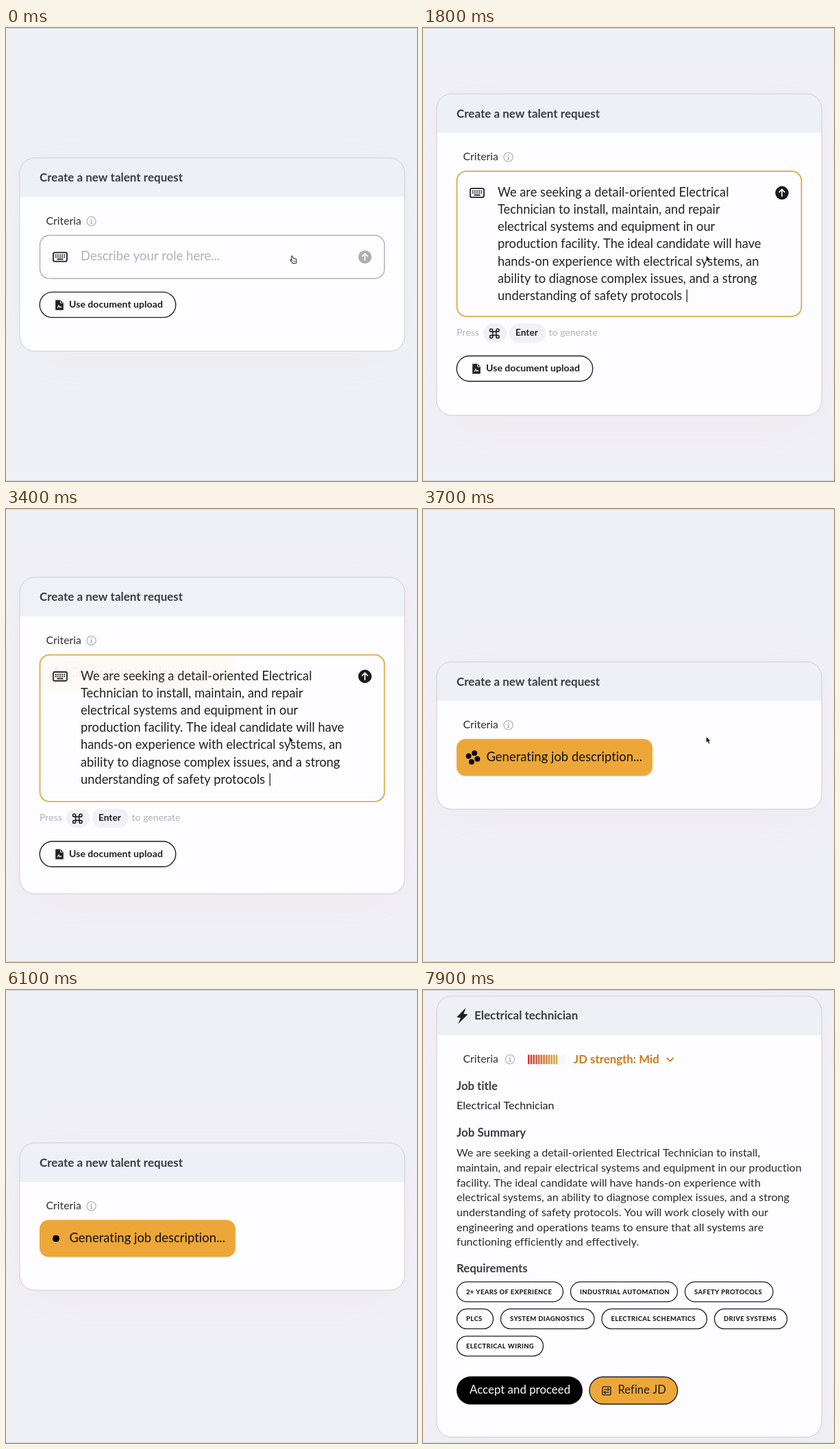
An HTML page with a canvas that plays this animation: 600x661 px, repeating every 8 s.

```html
<!DOCTYPE html>
<html lang="en">
<head>
<meta charset="utf-8">
<title>Talent request</title>
<style>
  html, body { margin: 0; width: 100%; height: 100%; overflow: hidden; background: #eef1f6; }
  canvas { display: block; }
</style>
</head>
<body>
<canvas id="stage" width="600" height="661"></canvas>
<script>
const ctx = document.getElementById('stage').getContext('2d');
const LOOP = 8000;
const CENTER_Y = 330.6;
const INK = '#1f1f23', HEAD = '#3b3c42', GREY = '#b2b2b5', AMBER = '#eda738', RUST = '#cc7a1c';
const PAPER = '#fdfcfe', COOL = '#edf1f6', WARM = '#eff0f6';

const ROLE_LINES = [
  'We are seeking a detail-oriented Electrical',
  'Technician to install, maintain, and repair',
  'electrical systems and equipment in our',
  'production facility. The ideal candidate will have',
  'hands-on experience with electrical systems, an',
  'ability to diagnose complex issues, and a strong',
  'understanding of safety protocols |'
];
const SUMMARY_LINES = [
  'We are seeking a detail-oriented Electrical Technician to install,',
  'maintain, and repair electrical systems and equipment in our production',
  'facility. The ideal candidate will have hands-on experience with',
  'electrical systems, an ability to diagnose complex issues, and a strong',
  'understanding of safety protocols. You will work closely with our',
  'engineering and operations teams to ensure that all systems are',
  'functioning efficiently and effectively.'
];
// Rows of [label, left, right]
const TAG_ROWS = [
  [['2+ YEARS OF EXPERIENCE', 49, 205], ['INDUSTRIAL AUTOMATION', 215, 372], ['SAFETY PROTOCOLS', 382, 511.5]],
  [['PLCS', 49, 103], ['SYSTEM DIAGNOSTICS', 113, 250.5], ['ELECTRICAL SCHEMATICS', 260.5, 415], ['DRIVE SYSTEMS', 425, 532]],
  [['ELECTRICAL WIRING', 49, 176]]
];

function ease(t, start, duration) {
  const p = Math.min(1, Math.max(0, (t - start) / duration));
  return p < 0.5 ? 16 * p ** 5 : 1 - 16 * (1 - p) ** 5;
}

// Outgoing content lingers a little longer than the motion.
const fadeOut = e => 1 - e ** 1.6;

// A minimal spacing also switches ligatures off.
function text(str, x, y, size, color = INK, weight = 400, spacing = 0.01) {
  ctx.font = `${weight} ${size}px Lato, sans-serif`;
  ctx.letterSpacing = `${spacing}px`;
  ctx.fillStyle = color;
  ctx.fillText(str, x, y);
}

function box(x, y, w, h, r, fill, stroke, line = 1.3) {
  ctx.beginPath();
  ctx.roundRect(x, y, w, h, r);
  paint(fill, stroke, line);
}

function disc(x, y, r, fill, stroke, line) {
  ctx.beginPath();
  ctx.arc(x, y, r, 0, 7);
  paint(fill, stroke, line);
}

function poly(points, fill, stroke, line, close = true) {
  ctx.beginPath();
  points.forEach(([x, y]) => ctx.lineTo(x, y));
  if (close) ctx.closePath();
  paint(fill, stroke, line);
}

function paint(fill, stroke, line) {
  if (fill) { ctx.fillStyle = fill; ctx.fill(); }
  if (stroke) { ctx.strokeStyle = stroke; ctx.lineWidth = line; ctx.stroke(); }
}

function layer(alpha, draw) {
  if (alpha < 0.004) return;
  ctx.save();
  ctx.globalAlpha *= alpha;
  draw();
  ctx.restore();
}

function at(x, y, draw) {
  ctx.save();
  ctx.translate(x, y);
  draw();
  ctx.restore();
}

function backdrop(x, y, w, h, warmth) {
  box(x, y, w, h, 0, COOL);
  layer(warmth, () => box(x, y, w, h, 0, WARM));
}

function infoIcon() {
  disc(0, 0, 6.6, null, '#a9a9ad', 1.1);
  ctx.fillStyle = '#a9a9ad';
  ctx.fillRect(-0.7, -3.6, 1.5, 1.6);
  ctx.fillRect(-1.6, -1, 2.3, 1);
  ctx.fillRect(-0.5, -1, 1.2, 4.2);
  ctx.fillRect(-1.8, 2.6, 3.8, 1);
}

function keyboardIcon() {
  box(-10, -6.5, 20, 13, 2, null, INK, 1.8);
  ctx.fillStyle = INK;
  for (let row = 0; row < 2; row++)
    for (let col = 0; col < 5; col++) ctx.fillRect(-7.2 + col * 3.1, -3.7 + row * 2.9, 1.9, 1.8);
  ctx.fillRect(-4.5, 2.3, 9, 1.8);
}

function documentIcon() {
  poly([[-5.5, -7], [1.5, -7], [5.5, -3], [5.5, 7], [-5.5, 7]], INK, INK, 0.6);
  poly([[1.5, -6.6], [1.5, -3], [5.2, -3]], null, PAPER, 0.9, false);
  poly([[-3, 4.2], [-1, 0.6], [0.2, 3.6], [1.6, 2.4], [3.2, 3.8]], null, PAPER, 1.1, false);
}

function commandIcon() {
  box(-2.6, -2.6, 5.2, 5.2, 0, null, INK, 1.6);
  for (const x of [-4.7, 4.7])
    for (const y of [-4.7, 4.7]) disc(x, y, 2.1, null, INK, 1.6);
}

function submitIcon(color) {
  disc(0, 0, 9.7, color);
  poly([[0, 5.4], [0, -4.6]], null, '#fff', 1.7, false);
  poly([[-4.4, -0.6], [0, -5], [4.4, -0.6]], null, '#fff', 1.7, false);
}

function refineIcon() {
  box(-6, -6, 12, 12, 1.5, null, INK, 1.4);
  poly([[-3.5, -2], [3.5, -2]], null, INK, 1.3, false);
  poly([[1.4, -4.2], [3.6, -2], [1.4, 0.2]], null, INK, 1.1, false);
  poly([[-3.5, 2.2], [3.5, 2.2]], null, INK, 1.3, false);
  poly([[-1.4, 0], [-3.6, 2.2], [-1.4, 4.4]], null, INK, 1.1, false);
}

function spinner(t) {
  const spread = 1.1 + 5.6 * (0.5 - 0.5 * Math.cos((t - 6100) / 1600 * 2 * Math.PI));
  const turn = (18 + (t - 3700) * 0.054) * Math.PI / 180;
  for (let i = 0; i < 4; i++) {
    const a = turn + i * Math.PI / 2;
    disc(Math.sin(a) * spread, -Math.cos(a) * spread, 3.9, '#000');
  }
}

function prompt(open) {
  const h = 63 + 151 * open;
  box(49.5, 113, 503, h, 14, PAPER, '#b0b0b2', 1.5);
  layer(open, () => box(49.5, 113, 503, h, 14, null, '#e3ae45', 1.6));
  at(79, 144.5, keyboardIcon);
  layer(fadeOut(open), () => text('Describe your role here...', 109, 149.7, 18.5, GREY));
  layer(open, () => {
    ROLE_LINES.forEach((line, i) => text(line, 109, 150 + i * 25.15, 18.3));
    at(0, 113 + h, () => {
      text('Press', 49, 28.5, 14.1, GREY);
      box(88, 10.5, 34, 28, 14, '#f1f1f5');
      at(104.3, 25, commandIcon);
      box(126, 10.5, 53, 28, 14, '#f1f1f5');
      text('Enter', 135, 28.5, 13.7, INK, 700);
      text('to generate', 183.5, 28.5, 14.1, GREY);
    });
  });
  at(524, 144.5, () => {
    submitIcon('#aeaeb0');
    layer(open, () => submitIcon('#18181b'));
  });
  at(0, 195.8 + 189.5 * open, () => {
    box(49.2, 0, 198.6, 37, 18.5, PAPER, INK, 1.4);
    at(78, 18.8, documentIcon);
    text('Use document upload', 92, 22.8, 14.1, INK, 700);
  });
}

function progress(t) {
  box(49, 112.5, 286, 54, 13, AMBER);
  at(73, 139.5, () => spinner(t));
  text('Generating job description...', 92.5, 145.2, 18.45, '#111');
}

function strength() {
  for (let i = 0; i < 15; i++) {
    const color = i < 12 ? `hsl(${2 + i * 3.7} ${58 + i}% ${50 + i * 0.6}%)` : '#f6f5f8';
    box(153 + i * 3.72, 85.5, 2.6, 14, 1.2, color);
  }
  text('JD strength: Mid', 220, 97.7, 16.8, RUST, 700);
  poly([[355.8, 90], [360.8, 95], [365.8, 90]], null, RUST, 1.9, false);
}

function result() {
  strength();
  text('Job title', 49, 137, 16.7, HEAD, 700);
  text('Electrical Technician', 49, 165.6, 16.1, INK);
  text('Job Summary', 49, 205.2, 16.9, HEAD, 700);
  SUMMARY_LINES.forEach((line, i) => text(line, 49, 234.6 + i * 21.65, 16.08, '#2a2a2f'));
  text('Requirements', 49, 403.6, 16.8, HEAD, 700);
  TAG_ROWS.forEach((row, i) => {
    const y = 417 + i * 39.6;
    for (const [label, left, right] of row) {
      box(left + 0.5, y, right - left - 1, 29, 14.5, null, INK, 1.3);
      text(label, left + 14, y + 18, 9.5, INK, 800, 0.35);
    }
  });
  box(49, 555, 184, 41, 20.5, '#000');
  text('Accept and proceed', 68, 580.6, 16.85, '#fff');
  box(243, 555.6, 128.6, 39.8, 20, AMBER, INK, 1.4);
  at(268, 576, refineIcon);
  text('Refine JD', 284.5, 580.6, 16.6);
}

function heading(done) {
  layer(fadeOut(done), () => text('Create a new talent request', 49, 34.5, 17, HEAD, 700));
  layer(done, () => {
    poly([[61, 19.5], [50.5, 30.5], [56, 31.2], [53, 38.2], [64.2, 27.2], [58.6, 26.5]], INK, INK, 1.2);
    text('Electrical technician', 75, 34.5, 17, HEAD, 700);
  });
}

function pointer(t) {
  if (t < 900) {
    at(419.5, 338, () => {
      const hand = [[-3, -5], [-1.6, -5.6], [0, -2], [3.6, -1.2], [4.8, 0.6], [4.2, 5.2], [-0.4, 5.6], [-4.6, 1.2], [-4, 0], [-2, 0.8]];
      poly(hand, '#fff', '#3a3a3e', 1.1);
      poly([[0.8, 1], [1, 3.6]], null, '#3a3a3e', 0.8, false);
      poly([[2.7, 1.2], [2.7, 3.6]], null, '#3a3a3e', 0.8, false);
    });
  } else if (t < 4800) {
    const slide = ease(t, 4250, 550);
    at(413.5 + 153 * slide, 332, () =>
      poly([[0, 0], [0, 9], [2, 7.3], [3.6, 10.8], [5.2, 10], [3.7, 6.7], [6.2, 6.5]], '#111', '#fff', 0.5));
  }
}

function frame() {
  const t = performance.now() % LOOP;
  const opened = ease(t, 1200, 800);
  const sent = ease(t, 3250, 500);
  const done = ease(t, 6273, 800);
  const height = 282 + 190 * opened - 257 * sent + 428.5 * done;
  const top = CENTER_Y - height / 2;

  backdrop(0, 0, 600, 661, opened);
  ctx.fillStyle = '#d3d5da';
  ctx.fillRect(0, 0, 600, 1);
  ctx.fillRect(0, 660, 600, 1);

  ctx.save();
  ctx.shadowColor = 'rgba(250, 180, 180, 0.09)';
  ctx.shadowBlur = 80;
  ctx.shadowOffsetY = 14;
  box(20, top, 562, height, 22, PAPER);
  ctx.restore();

  ctx.save();
  ctx.beginPath();
  ctx.roundRect(20, top, 562, height, 22);
  ctx.clip();
  ctx.translate(0, top);
  backdrop(20, 0, 562, 57, sent);
  heading(done);
  text('Criteria', 58.5, 97.3, 15.8, '#2f2f34');
  at(124.6 + 2.4 * done, 92.3, infoIcon);
  layer(fadeOut(sent), () => prompt(opened));
  layer(sent * fadeOut(done), () => progress(t));
  layer(done, result);
  ctx.restore();

  box(20, top, 562, height, 22, null, '#cdced2', 1);
  pointer(t);
  requestAnimationFrame(frame);
}

frame();
</script>
</body>
</html>
```
